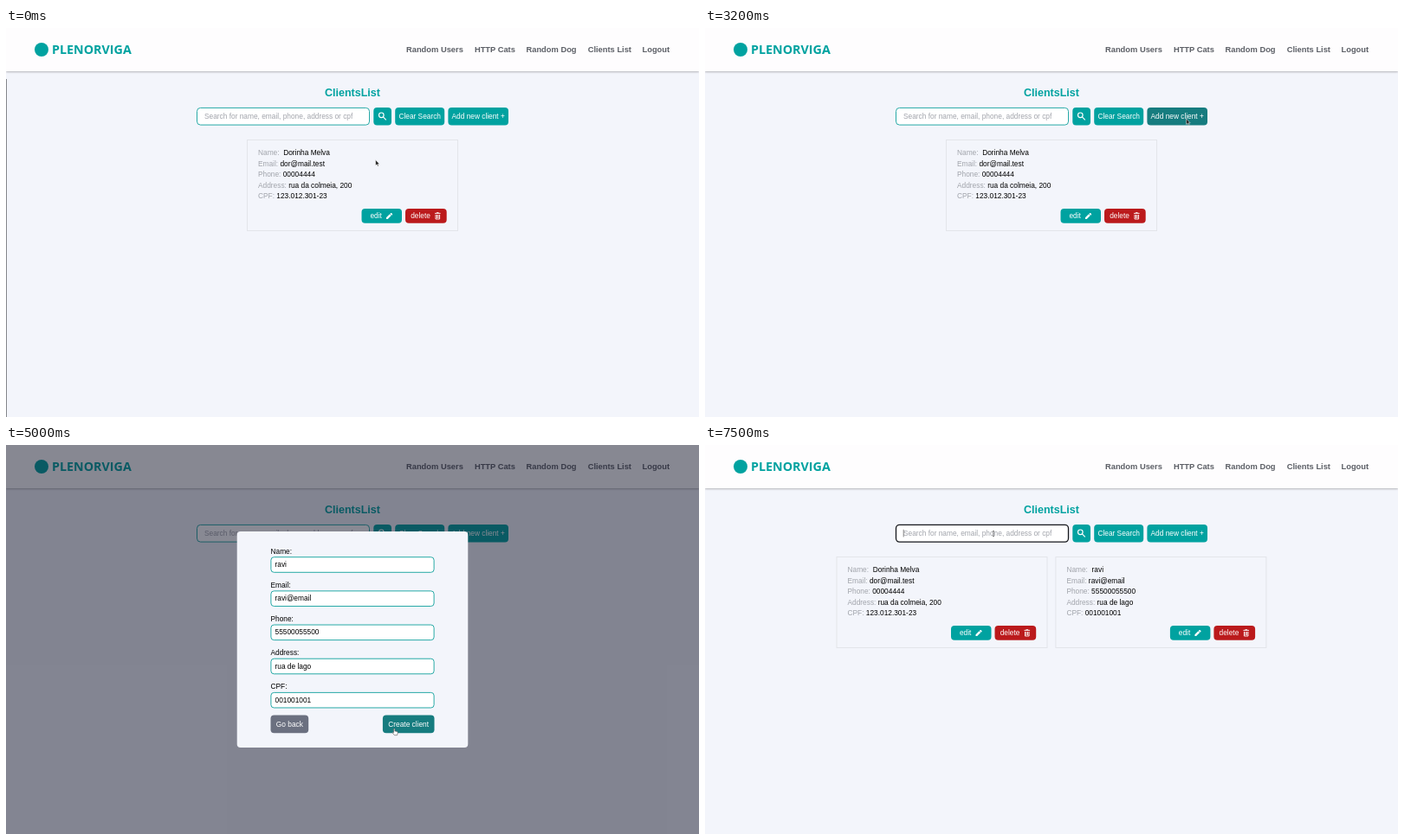
Write an HTML page that moves like this. It is 800 px wide and 450 px high and loops after 8 s.

```html
<!DOCTYPE html>
<html lang="en">
<head>
<meta charset="utf-8">
<title>Clients list</title>
<style>
  html, body { margin: 0; width: 100%; height: 100%; overflow: hidden; background: #f3f5fb; }
  svg { display: block; font: 8.333px "Liberation Sans", Arial, sans-serif; }
  text { white-space: pre; }
  .teal { fill: #00a2a0; }
  .hover { fill: #167c7f; }
  .red { fill: #bb1a1c; }
  .gray { fill: #6b7080; }
  .label { fill: #a1a4ab; }
  .light { fill: #fff; }
  .mid { text-anchor: middle; }
  .nav { font-size: 9.333px; font-weight: bold; fill: #5c5f66; }
  .title { font-size: 12.5px; font-weight: bold; }
  .brand { font: bold 14.3px "Open Sans", sans-serif; }
  .status { font: 8.2px "Noto Sans", sans-serif; fill: #c9d2d6; }
  .field { fill: #fff; stroke: #26a9a6; }
  .field.focus { stroke: #15171c; stroke-width: 1.3; }
  .header { fill: #fefdfe; filter: drop-shadow(0 1px 1.3px #0004); }
</style>
</head>
<body>
<svg id="stage" width="800" height="450" viewBox="0 0 800 450"></svg>
<script>
const LOOP = 8000, STEP = 100;
const stage = document.getElementById('stage');

const text = (x, y, content, cls = '') => `<text x="${x}" y="${y}" class="${cls}">${content}</text>`;
const box = (x, y, w, h, cls, r = 4, id = '') =>
  `<rect id="${id}" x="${x}" y="${y}" width="${w}" height="${h}" rx="${r}" class="${cls}"/>`;
const button = (x, y, w, h, label, cls, id) =>
  box(x, y, w, h, cls, 4, id) + text(x + w / 2, y + h / 2 + 2.8, label, 'light mid');
const group = (id, content) => `<g id="${id}">${content}</g>`;

const names = ['Name', 'Email', 'Phone', 'Address', 'CPF'];
const first = ['Dorinha Melva', 'dor@mail.test', '00004444', 'rua da colmeia, 200', '123.012.301-23'];
const second = ['ravi', 'ravi@email', '55500055500', 'rua de lago', '001001001'];

const pencil = `<path class="light" d="M439 219.3V221h1.7l4-4-1.7-1.7zM443.4 214.9l.8-.8q.4-.3.8 0l1 1q.3.4 0 .8l-.8.8z"/>`;
const trash = `<path d="M495 214.4h6.6M497 213.7h2.6M496 215.9v5.1h4.6v-5.1M497.5 216v4M499.1 216v4"
  fill="none" stroke="#fff" stroke-width=".9"/>`;

const card = (id, dx, values) => `<g id="${id}" transform="translate(${dx})">
  <rect x="278.5" y="129.5" width="243" height="105" fill="none" stroke="#e3e5ea"/>
  ${names.map((name, i) => text(291, 147.3 + i * 12.48,
    `<tspan class="label">${name}:${i ? '' : ' '}</tspan> ${values[i]}`)).join('')}
  ${box(410.5, 209, 46.5, 16.7, 'teal')}${text(420.4, 220, 'edit', 'light')}${pencil}
  ${box(461, 209, 47.7, 16.7, 'red')}${text(467.2, 220, 'delete', 'light')}${trash}
</g>`;

const page = `
  <rect width="800" height="450" fill="#f3f5fb"/>
  <rect width="800" height="50" class="header"/>
  <circle cx="41" cy="25" r="8" class="teal"/>
  ${text(53, 30.3, 'PLENORVIGA', 'brand teal')}
  ${text(462, 28.4, 'Random Users', 'nav')}
  ${text(540.9, 28.4, 'HTTP Cats', 'nav')}
  ${text(600.5, 28.4, 'Random Dog', 'nav')}
  ${text(671.7, 28.4, 'Clients List', 'nav')}
  ${text(734.5, 28.4, 'Logout', 'nav')}
  <path id="underline" d="M672 30.1H722.3" stroke="#5c5f66" stroke-width=".9"/>
  <path id="edge" d="M.4 59V450" stroke="#6a6c70" stroke-width=".9"/>
  ${text(400, 78.9, 'ClientsList', 'title teal mid')}
  ${box(220.5, 92.4, 199, 19.7, 'field', 4, 'search')}
  ${text(229, 104.7, 'Search for name, email, phone, address or cpf', 'label')}
  <path id="caret" d="M229.2 97.8V106.4" stroke="#333" stroke-width=".6"/>
  ${box(424.3, 92, 20.7, 20.6, 'teal')}
  <g fill="none" stroke="#fff" stroke-width="1.2">
    <circle cx="433.3" cy="100.8" r="2.8"/><path d="M435.4 102.9L438.8 106.3"/>
  </g>
  ${button(449.2, 92, 57, 20.6, 'Clear Search', 'teal')}
  ${button(510.4, 92, 69.6, 20.6, 'Add new client +', 'teal', 'add')}
  ${card('only', 0, first)}
  ${group('both', card('left', -126.5, first) + card('right', 126.4, second))}
  ${group('status', `<path d="M0 437.5H87q2.2 0 2.2 2.2V450H0z" fill="#36464d"/>`
    + text(2.4, 446.8, 'localhost:3000/clients', 'status'))}`;

const modal = group('modal', `
  <rect width="800" height="450" fill="#121428" fill-opacity=".5"/>
  ${box(266.7, 100, 266.6, 250, '', 4, 'panel')}
  ${names.map((name, i) => {
    const y = 125.5 + i * 39.17;
    return text(305.5, y, name + ':') + box(305.9, y + 4.2, 188.2, 17.6, 'field', 3.5)
      + text(310.5, y + 15.5, second[i]);
  }).join('')}
  ${button(305.5, 312.6, 43.7, 20.7, 'Go back', 'gray')}
  ${button(434.9, 312.6, 59.6, 20.7, 'Create client', 'teal', 'create')}`);

const cursor = group('cursor', `
  <path id="arrow" d="M0 0V6.5L1.5 5.2 2.5 7.4 3.6 6.9 2.6 4.8H4.6z" fill="#222" stroke="#fff" stroke-width=".5"/>
  <path id="hand" d="M1.2 .7Q1.9-.3 2.5 .7V3.2L5.2 3.8Q6 4 5.8 5L5.2 8H2L-.2 5.2Q-.2 4.2 1.2 5z"
    fill="#fff" stroke="#555" stroke-width=".6"/>
  <path id="beam" d="M-1-2.5H1M0-2.5V3.5M-1 3.5H1" stroke="#444" stroke-width=".6"/>`);

stage.innerHTML = page + modal + cursor;
const el = id => document.getElementById(id);
el('panel').setAttribute('fill', '#f3f5fb');

// Pointer stops: time, x, y
const stops = [
  [0, 426.6, 152.6], [900, 692, 25], [1600, 690, 29], [2000, 687, 29.3],
  [2800, 571, 104], [2900, 557, 104.5], [3200, 555.6, 105], [3300, 555.6, 105],
  [3900, 410, 132], [4350, 382, 215], [4800, 462, 322], [5000, 446.4, 327.7],
  [5400, 447, 328.7], [5900, 447, 329], [6700, 333, 102], [LOOP, 333, 102]
];

function pointerAt(t) {
  const i = stops.findIndex(stop => stop[0] > t);
  const [t0, x0, y0] = stops[i - 1], [t1, x1, y1] = stops[i];
  const p = (t - t0) / (t1 - t0), k = p * p * (3 - 2 * p);
  return [x0 + (x1 - x0) * k, y0 + (y1 - y0) * k];
}

const show = (id, on) => { el(id).style.display = on ? '' : 'none'; };
const hover = (id, on) => el(id).setAttribute('class', on ? 'hover' : 'teal');

function render(now) {
  const t = Math.floor(now % LOOP / STEP) * STEP;
  const during = (from, to) => t >= from && t < to;
  const onLink = during(800, 2200), onCreate = during(4700, 5400);
  const kind = onLink || onCreate ? 'hand' : t >= 6600 ? 'beam' : 'arrow';

  show('underline', onLink);
  show('status', during(1000, 2300));
  show('edge', t < 3200);
  show('modal', during(3300, 5400));
  show('only', t < 5400);
  show('both', t >= 5400);
  show('caret', t >= 7400);
  el('search').classList.toggle('focus', t >= 7400);
  hover('add', during(2700, 3300));
  hover('create', onCreate);
  for (const id of ['arrow', 'hand', 'beam']) show(id, id === kind);
  el('cursor').setAttribute('transform', `translate(${pointerAt(t)})`);
  requestAnimationFrame(frame);
}

const start = performance.now();
function frame() { render(performance.now() - start); }
frame();
</script>
</body>
</html>
```
